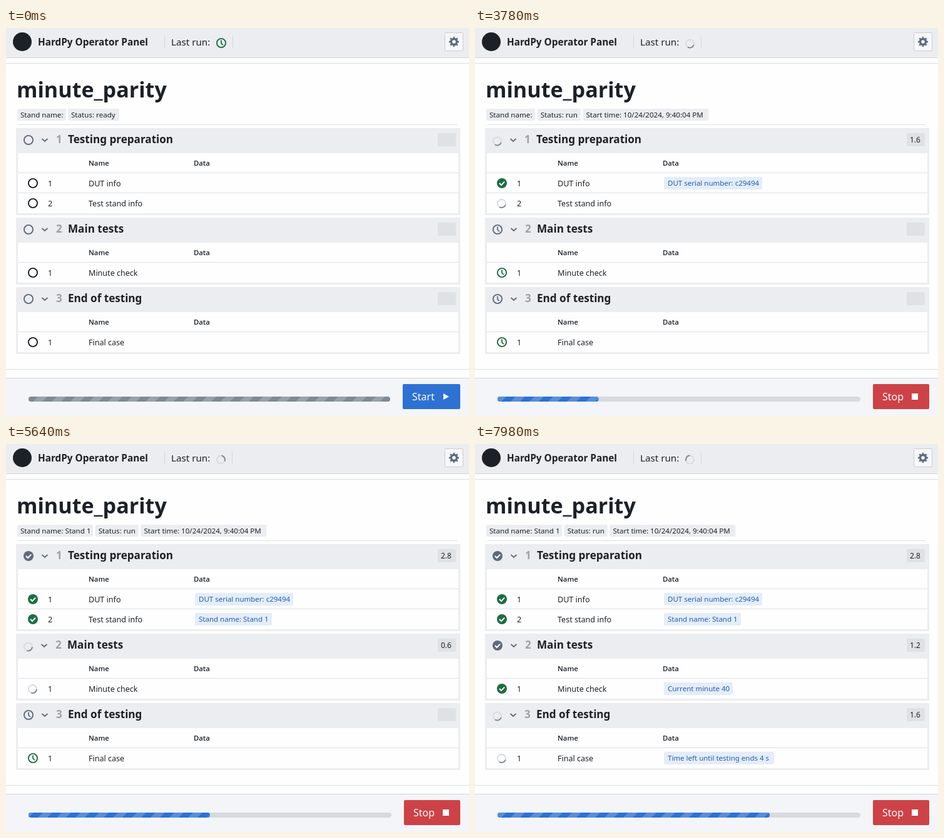
An HTML page that plays this animation: 740 px wide and 620 px high, repeating every 8 s.

```html
<!DOCTYPE html>
<html lang="en">
<head>
<meta charset="utf-8">
<title>Operator panel</title>
<style>
  html, body { margin: 0; width: 100%; height: 100%; overflow: hidden; background: #fefefe; }
  svg { display: block; font-family: "Noto Sans", "Open Sans", sans-serif; fill: #1c2127; }
  .brand { font-size: 15.3px; font-weight: 700; }
  .last { font-size: 15.2px; }
  .title { font-size: 34.1px; font-weight: 700; }
  .section { font-size: 17.1px; font-weight: 700; }
  .number { font-size: 17.1px; font-weight: 700; fill: #9aa2ad; }
  .head { font: 600 11.3px "Open Sans", "Noto Sans", sans-serif; }
  .cell { font-size: 12.55px; }
  .tag { font-size: 11.6px; }
  .data { font-size: 11.5px; fill: #215db0; }
  .time { font-size: 12px; }
  .button { font-size: 16px; fill: #fff; }
</style>
</head>
<body>
<svg width="740" height="620" viewBox="0 0 740 620">
  <defs>
    <pattern id="stripes" width="30" height="8" patternUnits="userSpaceOnUse">
      <rect x="15" width="15" height="8"/>
    </pattern>
  </defs>
  <g id="base"></g>
  <g id="live"></g>
</svg>
<script>
const LOOP = 8000;
const RUN = 2120;
const INK = '#1c2127', GREY = '#5f6b7c', GREEN = '#1c6e42';
const PAPER = '#fefefe', PANEL = '#ebedf0', LINE = '#dcdfe3', RULE = '#d3d6db';

const sections = [
  { y: 160, name: 'Testing preparation', start: RUN, end: 4980, total: 2.8, cases: [
    { name: 'DUT info', start: RUN, end: 3620, data: [[3620, 'DUT serial number: c29494']], width: 157 },
    { name: 'Test stand info', start: 3620, end: 4960, data: [[4960, 'Stand name: Stand 1']], width: 123 }] },
  { y: 303, name: 'Main tests', start: 5000, end: 6280, total: 1.2, cases: [
    { name: 'Minute check', start: 5000, end: 6260, data: [[6260, 'Current minute 40']], width: 110 }] },
  { y: 414, name: 'End of testing', start: 6320, end: Infinity, cases: [
    { name: 'Final case', start: 6320, end: Infinity, width: 176, data: [
      [6420, 'Time left until testing ends 5 s'], [7440, 'Time left until testing ends 4 s']] }] }
];
const progressSteps = [[3620, 580, 145], [4960, 145, 290], [6260, 290, 435]];

const rect = (x, y, w, h, fill, extra = '') =>
  `<rect x="${x}" y="${y}" width="${w}" height="${h}" fill="${fill}" ${extra}/>`;
const text = (x, y, style, value) => `<text x="${x}" y="${y}" class="${style}">${value}</text>`;
const circle = (x, y, r, stroke, width, extra = '') =>
  `<circle cx="${x}" cy="${y}" r="${r}" fill="none" stroke="${stroke}" stroke-width="${width}" ${extra}/>`;
const stroke = (d, color, width) =>
  `<path d="${d}" fill="none" stroke="${color}" stroke-width="${width}"/>`;

const clock = (x, y, color) =>
  circle(x, y, 7.1, color, 1.9) + stroke(`M${x} ${y - 4.5}v4.8l2.8 2.8`, color, 1.8);
const check = (x, y, color) =>
  `<circle cx="${x}" cy="${y}" r="8" fill="${color}"/>` + stroke(`M${x - 4} ${y}l3 3 5.2-5.4`, '#fff', 2);
const spinner = (x, y, elapsed) =>
  circle(x, y, 6.5, '#d8dbe0', 2) +
  circle(x, y, 6.5, '#7f8996', 2,
    `pathLength="100" stroke-dasharray="25 75" stroke-linecap="round" transform="rotate(${elapsed * 0.72 - 90} ${x} ${y})"`);

function drawBase() {
  let out = rect(0, 0, 740, 47, PANEL) + rect(0, 47, 740, 1, RULE) + rect(0, 56, 740, 1, LINE)
    + `<circle cx="26" cy="22" r="15" fill="${INK}"/>`
    + text(51, 28, 'brand', 'HardPy Operator Panel') + rect(253, 12, 1, 20, RULE)
    + text(264, 28, 'last', 'Last run:')
    + rect(701.5, 7.5, 29, 29, '#f6f7f9', `rx="2" stroke="#c9cdd3"`)
    + circle(716, 22, 4.5, GREY, 3.4)
    + circle(716, 22, 6.9, GREY, 2.2, 'pathLength="16" stroke-dasharray="1 1" stroke-dashoffset=".5"')
    + text(17, 111, 'title', 'minute_parity') + rect(20, 154, 701, 1, LINE)
    + rect(0, 545, 740, 1, LINE) + rect(0, 559, 740, 1, RULE) + rect(0, 560, 740, 60, '#f4f5f8');
  for (const { y, cases } of sections) {
    const rows = cases.length + 1;
    out += rect(16, y, 710, 43 + rows * 32, PANEL) + rect(19, y + 40, 704, rows * 32, PAPER)
      + text(132, y + 60, 'head', 'Name') + text(300, y + 60, 'head', 'Data');
    cases.forEach(({ name }, i) => {
      const mid = y + 88 + i * 32;
      out += rect(19, mid - 17, 704, 1, LINE)
        + text(67, mid + 4.5, 'cell', i + 1) + text(132, mid + 4.5, 'cell', name);
    });
  }
  return out;
}

function drawTags(t) {
  const running = t >= RUN, named = t >= 4980;
  const tags = [[named ? 'Stand name: Stand 1' : 'Stand name:', named ? 121 : 78],
    [running ? 'Status: run' : 'Status: ready', running ? 69 : 82]];
  if (running) tags.push(['Start time: 10/24/2024, 9:40:04 PM', 201]);
  let x = 18;
  return tags.map(([value, width]) => {
    const tag = rect(x, 129, width, 19, PANEL, 'rx="2"') + text(x + 5, 143, 'tag', value);
    x += width + (running ? 3.7 : 3);
    return tag;
  }).join('');
}

function statusIcon(t, item, x, y, idleColor, color) {
  if (t < RUN) return circle(x, y, 7.1, idleColor, 1.9);
  if (t < item.start) return clock(x, y, color);
  if (t >= item.end) return check(x, y, color);
  return spinner(x - 0.5, y + (color === GREY ? 2 : 0.5), t - item.start);
}

function drawSection(t, section, index) {
  const { y, name, start, end, total, cases } = section;
  const active = t >= start && t < end, shift = active ? 1 : 0;
  let out = statusIcon(t, section, 36, y + 19, GREY, GREY)
    + stroke(`M${57.5 - shift} ${y + 17}l4.5 4 4.5-4`, GREY, 1.9)
    + text(80 - shift, y + 24, 'number', index + 1) + text(99 - shift, y + 24, 'section', name)
    + rect(690, y + 8, 29, 21, '#dfe2e5', 'rx="2"');
  if (t >= start) {
    const seconds = active ? Math.floor((t - start) / 100) / 10 : total;
    out += text(695, y + 23, 'time', Math.min(seconds, total || 99).toFixed(1));
  }
  cases.forEach((item, i) => {
    const mid = y + 88 + i * 32;
    out += statusIcon(t, item, 43, mid, INK, GREEN);
    const shown = item.data.filter(([from]) => t >= from).pop();
    if (shown) out += rect(302, mid - 10, item.width, 20, '#e4edf9', 'rx="2"') + text(308, mid + 4, 'data', shown[1]);
  });
  return out;
}

function drawFooter(t) {
  const running = t >= RUN, full = running ? 580 : 578;
  let width = full;
  for (const [from, a, b] of progressSteps) {
    if (t >= from) width = b + (a - b) * (1 - Math.min(1, (t - from) / 200)) ** 2;
  }
  const offset = running ? -((t - RUN) / 10 % 30) : 0;
  const pattern = document.getElementById('stripes');
  pattern.setAttribute('patternTransform', `translate(${36 + offset} 589) skewX(-45)`);
  pattern.firstElementChild.setAttribute('fill', running ? '#578edb' : '#99a1ab');
  const bar = rect(36, 589, full, 8, '#d6dade', 'rx="4"')
    + rect(36, 589, width, 8, running ? '#2d72d2' : '#7f8996', 'rx="4"')
    + rect(36, 589, width, 8, 'url(#stripes)', 'rx="4"');
  const button = running
    ? rect(636, 569, 90, 40, '#cd4246', 'rx="2"') + text(651, 595, 'button', 'Stop') + rect(698, 584, 10, 10, '#fff')
    : rect(634, 569, 92, 40, '#2d72d2', 'rx="2"') + text(649, 595, 'button', 'Start')
      + '<path d="M699 584l9 5-9 5z" fill="#fff"/>';
  return bar + button;
}

function draw(t) {
  const running = t >= RUN;
  return (running ? spinner(343.5, 25, t - RUN) : clock(344, 24, GREEN))
    + rect(running ? 361 : 362, 12, 1, 20, RULE)
    + drawTags(t) + sections.map((s, i) => drawSection(t, s, i)).join('') + drawFooter(t);
}

const live = document.getElementById('live');
document.getElementById('base').innerHTML = drawBase();
const origin = performance.now();
function tick() {
  live.innerHTML = draw((performance.now() - origin) % LOOP);
  requestAnimationFrame(tick);
}
tick();
</script>
</body>
</html>
```
